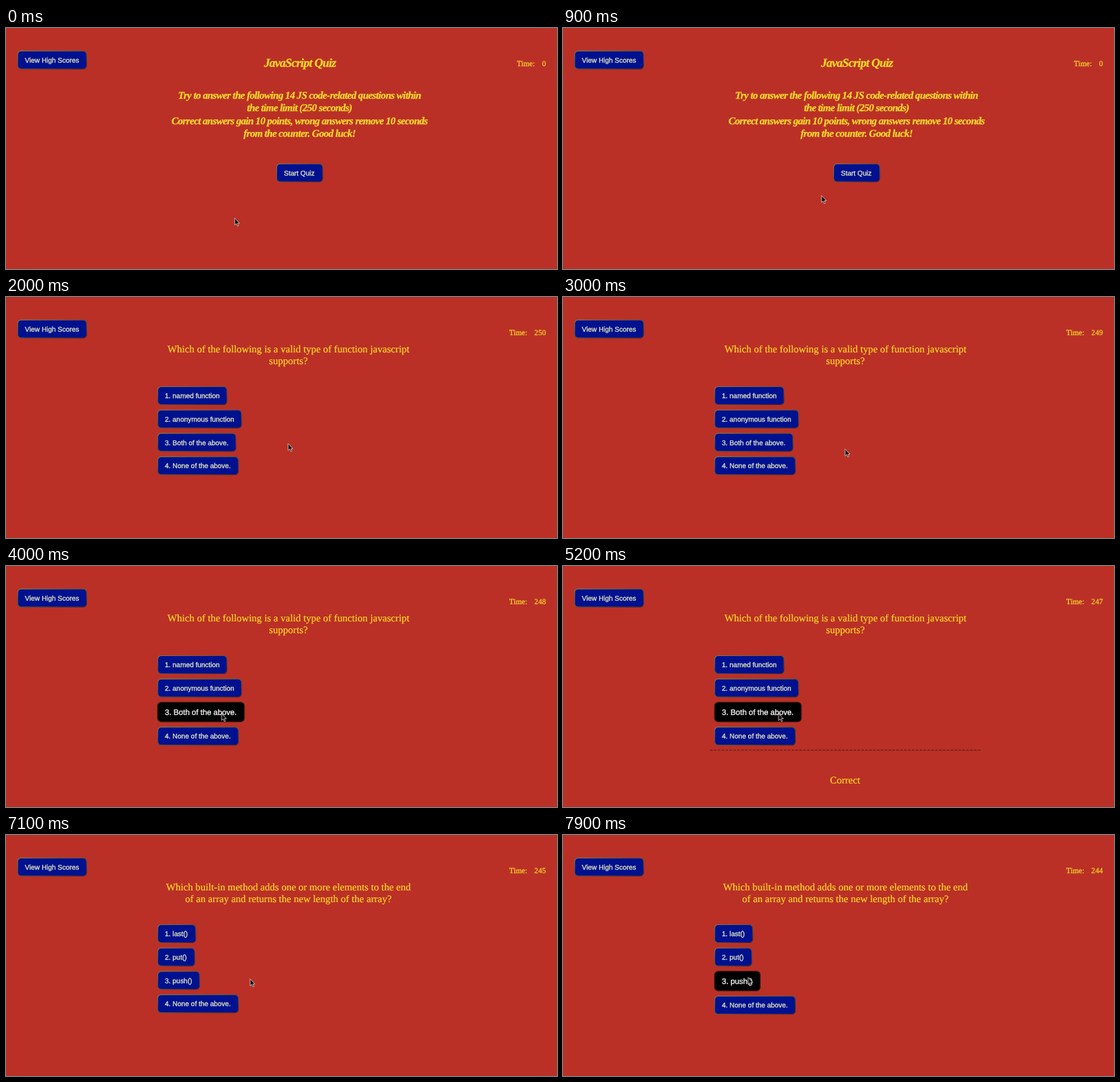
These frames come from a looping animation (795x348 px, 8000 ms). An HTML page:

```html
<!DOCTYPE html>
<html lang="en">
<head>
<meta charset="utf-8">
<title>JavaScript Quiz</title>
<style>
  html, body { margin: 0; width: 100%; height: 100%; overflow: hidden; background: #ba3026; }
  svg { display: block; width: 795px; height: 348px; }
  text { white-space: pre; text-rendering: geometricPrecision; }
  .serif { font: 14.55px "Liberation Serif", Times, serif; fill: #f8d827; stroke: #f8d827; stroke-width: .2; text-anchor: middle; }
  .time { font: 11.1px "Liberation Serif", Times, serif; fill: #f2cc2b; stroke: #f2cc2b; stroke-width: .3; }
  .end { text-anchor: end; }
  .script { font: italic bold 14.8px "Liberation Serif", Times, serif; letter-spacing: -.58px; fill: #f5d92c; stroke: #f5d92c; stroke-width: .3; text-anchor: middle; }
  .title { font-size: 17.4px; letter-spacing: -.72px; }
  .label { font-family: "Liberation Sans", Arial, sans-serif; stroke-width: .35; }
</style>
</head>
<body>
<svg viewBox="0 0 795 348">
  <defs>
    <linearGradient id="edge" x1="0" y1="0" x2="1" y2="1">
      <stop offset="0" stop-color="#82764a"/>
      <stop offset="1" stop-color="#43282a"/>
    </linearGradient>
  </defs>
  <g id="stage"></g>
</svg>
<script>
const LOOP = 8000, STEP = 100;
const START = 1900, CORRECT = 4800, NEXT = 5800;
const stage = document.getElementById('stage');

// time, x, y of the pointer tip
const path = [
  [0, 330, 274.5], [500, 330, 274.5], [900, 373, 242], [1300, 407, 211.5],
  [2500, 407, 211.5], [2800, 407, 219.5], [3100, 407, 219.5], [3600, 311, 213],
  [5800, 311, 213], [6200, 382, 208.5], [6900, 382, 208.5], [7500, 267, 205.5], [8000, 267, 205.5]
];

const intro = [
  'Try to answer the following 14 JS code-related questions within',
  'the time limit (250 seconds)',
  'Correct answers gain 10 points, wrong answers remove 10 seconds',
  'from the counter. Good luck!'
];

// each answer: label, label width
const questions = [
  {
    lines: ['Which of the following is a valid type of function javascript', 'supports?'],
    answers: [['1. named function', 79], ['2. anonymous function', 100], ['3. Both of the above.', 92], ['4. None of the above.', 95.5]]
  },
  {
    lines: ['Which built-in method adds one or more elements to the end', 'of an array and returns the new length of the array?'],
    answers: [['1. last()', 34], ['2. put()', 32.5], ['3. push()', 39.5], ['4. None of the above.', 95.5]]
  }
];

const text = (cls, x, y, str) => `<text class="${cls}" x="${x}" y="${y}">${str}</text>`;

function pointer(t) {
  const i = path.findIndex(p => p[0] > t);
  const [t0, x0, y0] = path[i - 1], [t1, x1, y1] = path[i];
  const u = (t - t0) / (t1 - t0), e = u * u * (3 - 2 * u);
  return [x0 + (x1 - x0) * e, y0 + (y1 - y0) * e];
}

const inside = ([px, py], x, y, w, h) => px >= x && px <= x + w && py >= y && py <= y + h;

function button(x, y, label, textWidth, hover) {
  const k = hover ? 1.13 : 1;
  const w = 22 + textWidth * k, h = hover ? 29 : 27;
  const ink = hover ? '#f2f2f2' : '#dfe0bd';
  return `<rect x="${x + .5}" y="${y + .5}" width="${w - 1}" height="${h - 1}" rx="5"
      fill="${hover ? '#000' : '#00118f'}" stroke="${hover ? '#30120e' : 'url(#edge)'}" stroke-width="1.2"/>
    <text class="label" x="${x + 11}" y="${y + h / 2 + 3.6 * k}" font-size="${9.95 * k}"
      fill="${ink}" stroke="${ink}">${label}</text>`;
}

function introPage(tip) {
  const hover = inside(tip, 390, 196, 67, 26);
  return text('script title', 424, 55.5, 'JavaScript Quiz') +
    intro.map((s, i) => text('script', 423.5, 101.5 + i * 18.5, s)).join('') +
    button(hover ? 387.4 : 390, 195.6, 'Start Quiz', 45.5, hover);
}

function quizPage({ lines, answers }, tip) {
  let y = 129;
  const list = answers.map(([label, w]) => {
    const hover = inside(tip, 218.3, y, 21 + w, 26);
    const out = button(218.3, y, label, w, hover);
    y += hover ? 35.8 : 33.7;
    return out;
  });
  return lines.map((s, i) => text('serif', 407.5, 80 + i * 17.3, s)).join('') + list.join('');
}

const verdict =
  '<path d="M212 265.8H603" stroke="#64201a" stroke-width="1.3" stroke-dasharray="4 1.6"/>' +
  text('serif', 407, 314, 'Correct');

function draw(t) {
  const tip = pointer(t), playing = t >= START;
  const left = playing ? 250 - Math.floor((t - START) / 1000) : 0;
  stage.innerHTML =
    button(16.3, 32.7, 'View High Scores', 78.5, false) +
    text('time', playing ? 726 : 737, 54.5, 'Time:') +
    text('time end', 779, 54.5, left) +
    (playing ? quizPage(questions[t < NEXT ? 0 : 1], tip) : introPage(tip)) +
    (t >= CORRECT && t < NEXT ? verdict : '') +
    `<path transform="translate(${tip})" d="M0 0V10L2.3 8L4 11.6L5.6 10.9L4 7.5H7Z"
      fill="#141010" stroke="#d8cfcb" stroke-width=".8"/>`;
}

let last = -1;
function tick(now) {
  const t = Math.floor((now % LOOP) / STEP) * STEP;
  if (t !== last) draw(last = t);
  requestAnimationFrame(tick);
}
draw(0);
requestAnimationFrame(tick);
</script>
</body>
</html>
```
